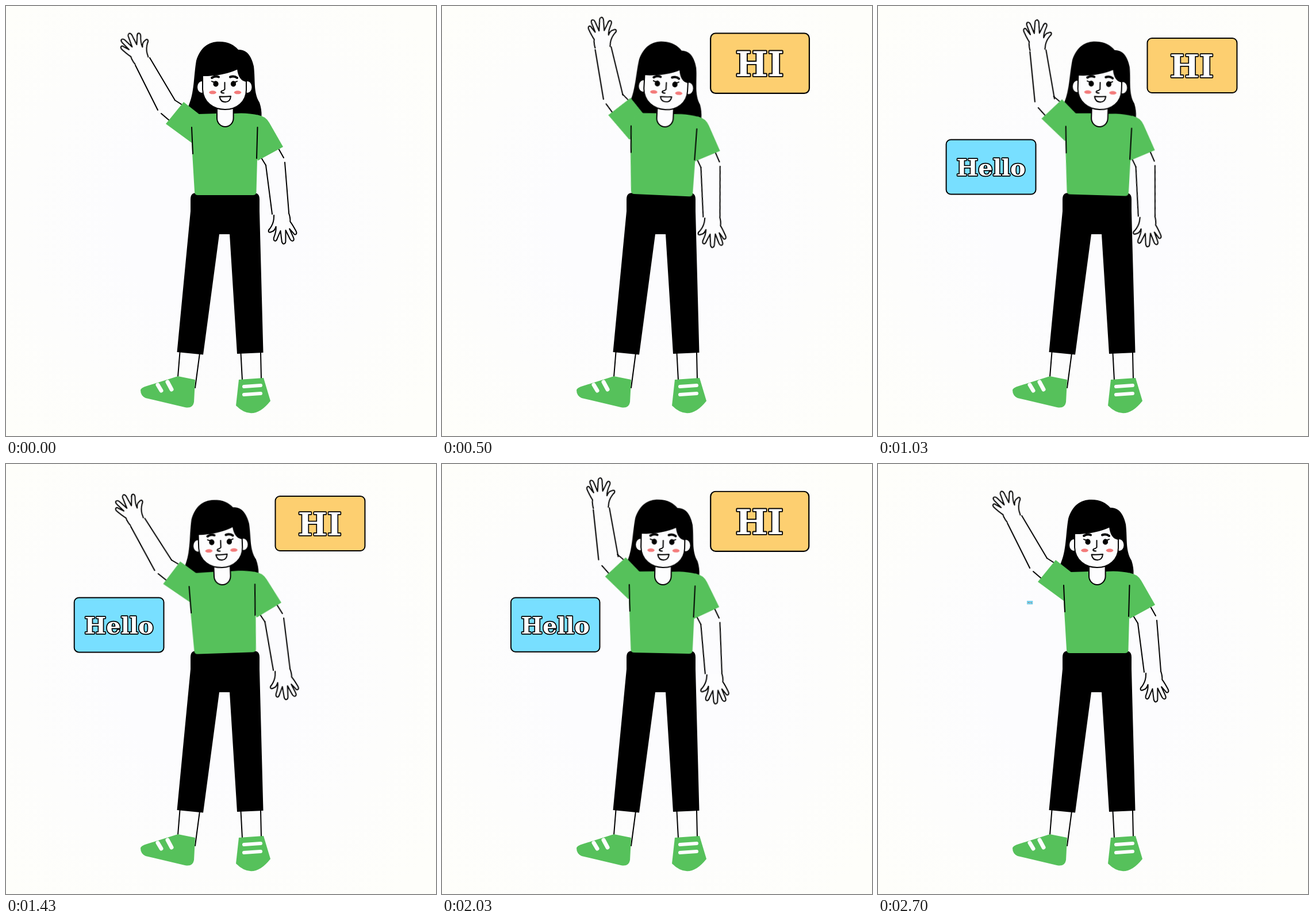
Animation of 748 by 748 pixels, one loop 2.73 s. Source, as an HTML page without scripts:

```html
<!DOCTYPE html>
<html lang="en">
<head>
<meta charset="utf-8">
<title>Waving hello</title>
<style>
  html, body { margin: 0; width: 100%; height: 100%; overflow: hidden; background: #fcfcfd; }
  svg { display: block; width: 100%; height: 100%; }

  .green { fill: #56c15b; }
  .skin { fill: #fdfdfe; }
  .line { fill: none; stroke: #000; stroke-width: 2; stroke-linecap: round; stroke-linejoin: round; }
  .skin.line { fill: #fdfdfe; }
  .brow { stroke-width: 4; }
  .strap { fill: none; stroke: #fdfdfe; stroke-linecap: round; }
  .blush { fill: #f37b7b; }
  .card text {
    font-family: "DejaVu Serif", serif; font-weight: bold; text-anchor: middle;
    fill: #fff; stroke: #000; stroke-width: 3.4; stroke-linejoin: round; paint-order: stroke;
  }
  .card rect { stroke: #000; stroke-width: 2; }

  .move { animation: 2730ms cubic-bezier(.37, 0, .63, 1) infinite; }
  .bob { animation-name: bob; }
  .torso { animation-name: torso; transform-origin: 381px 340px; }
  .head { animation-name: head; transform-origin: 381px 185px; }
  .wave-upper { animation-name: wave-upper; transform-origin: 340px 224px; }
  .wave-fore { animation-name: wave-fore; transform-origin: 279px 174px; }
  .wave-hand { animation-name: wave-hand; transform-origin: 236px 95px; }
  .rest-upper { animation-name: rest-upper; transform-origin: 440px 205px; }
  .rest-fore { animation-name: rest-fore; transform-origin: 468px 274px; }
  .eyes { animation-name: blink; transform-origin: 380px 133px; }
  .mouth { animation-name: talk; transform-origin: 381px 160px; }
  .hi { animation-name: hi; transform-origin: 481.8px 141.5px; }
  .hello { animation-name: hello; transform-origin: 268.7px 238.4px; }

  @keyframes bob { 0%, 20%, 100% { transform: none; } 9.9% { transform: translateY(1.5px); } }
  @keyframes torso {
    0%, 100% { transform: rotate(0deg); }
    27.8% { transform: rotate(3.5deg); }
    53.1% { transform: rotate(-2deg); }
    80.2% { transform: rotate(1.6deg); }
  }
  @keyframes head { 0%, 12%, 38%, 100% { transform: rotate(0deg); } 26.7% { transform: rotate(1.2deg); } }
  @keyframes wave-upper {
    0%, 51.3%, 100% { transform: rotate(0deg); }
    23.8% { transform: rotate(12deg); }
    76.2% { transform: rotate(6.8deg); }
  }
  @keyframes wave-fore {
    0%, 8.8%, 52.4%, 98.9%, 100% { transform: rotate(0deg); }
    35.5% { transform: rotate(14deg); }
    80.2% { transform: rotate(14deg); }
  }
  @keyframes wave-hand {
    0%, 52.4%, 100% { transform: rotate(0deg); }
    22% { transform: rotate(6deg); }
    76% { transform: rotate(3deg); }
  }
  @keyframes rest-upper {
    0%, 100% { transform: rotate(0deg); }
    31.1% { transform: rotate(5.4deg); }
    53.1% { transform: rotate(-.5deg); }
    80.2% { transform: rotate(2.8deg); }
  }
  @keyframes rest-fore {
    0%, 52.4%, 100% { transform: rotate(0deg); }
    12%, 38%, 74% { transform: rotate(-1.3deg); }
  }
  @keyframes blink { 0%, 7.3%, 14.6%, 100% { transform: none; } 11% { transform: scaleY(.15); } }
  @keyframes talk { 0%, 16%, 37%, 100% { transform: none; } 26.7% { transform: scaleY(.42); } }
  @keyframes hi {
    0%, 8.2% { transform: scale(0); }
    19.4% { transform: scale(1.125); }
    26.7% { transform: scale(.9); }
    34.1% { transform: scale(1.05); }
    41.4% { transform: scale(.95); }
    48.7% { transform: scale(1.02); }
    56% { transform: scale(.98); }
    60.1% { transform: scale(1); }
    67.4% { transform: scale(.92); }
    75.1% { transform: scale(1.1); }
    84.6%, 100% { transform: scale(0); }
  }
  @keyframes hello {
    0%, 23.8% { transform: scale(0); }
    34.1% { transform: scale(1.12); }
    41.4% { transform: scale(.88); }
    48.7% { transform: scale(1.045); }
    56% { transform: scale(.955); }
    63.4% { transform: scale(1.02); }
    69.6% { transform: scale(1.04); }
    79.9% { transform: scale(.93); }
    89% { transform: scale(1.125); }
    98.9% { transform: scale(.064); }
    99.9%, 100% { transform: scale(0); }
  }
</style>
</head>
<body>
<svg viewBox="0 0 748 748">
  <defs>
    <radialGradient id="bg" gradientUnits="userSpaceOnUse" cx="350" cy="374" r="500">
      <stop offset=".3" stop-color="#fcfcfe"/>
      <stop offset="1" stop-color="#fefefa"/>
    </radialGradient>
    <!-- open hand, wrist at the origin, fingers up -->
    <path id="hand" class="skin line" d="M-13-1Q-14-10-12-16Q-15-23-18-34C-20-41-14-42-13-37L-8-28L-11-43C-13-51-7-52-5-46L-1-29L3-46C4-53 10-53 10-47L8-28L16-39C20-46 25-43 22-37Q15-27 14-19Q18-26 23-26C31-28 29-22 25-20Q18-14 15-6L13 1"/>
  </defs>
  <rect width="748" height="748" fill="url(#bg)"/>

  <!-- legs -->
  <path class="line" d="M302.500 602L299 645M337 604L329 664M408.500 604L411 651M443 603L444 649"/>
  <path class="green" d="M299 644L329 650L327 689Q325 701 311 698L243 682Q234 678 234 668Q235 664 245 661Z"/>
  <path class="strap" stroke-width="7" d="M264 659L270 669M281 654L288 667"/>
  <path class="green" d="M405 650L448 647L460 687Q430 725 400 695Z"/>
  <path class="strap" stroke-width="6" d="M414 662L443 660M414 676L443 674"/>
  <path d="M321 336Q321 325 331 325H431Q441 325 441 336V357L447.500 603L402 605L389 397H371L343 606.500L297.500 602L321 357Z"/>

  <g class="move bob"><g class="move torso">
    <g class="move head">
      <path d="M317 175C328 150 326 125 331 95C338 72 352 62 371 62C387 62 397 68 404 76C420 75 428 90 431 105C434 130 430 150 441 168Q445 180 444.500 192L334 192Q320 184 317 175Z"/>
    </g>

    <!-- waving arm -->
    <g class="move wave-upper">
      <path class="line" d="M294 164L305 171M270 187L284 199"/>
      <g class="move wave-fore">
        <path class="line" d="M225 103L264 181M250 90L294 164"/>
        <g class="move wave-hand"><use href="#hand" transform="translate(236 95) rotate(-33)"/></g>
      </g>
      <path class="green" d="M309 167L337 189L345 230L323 238L278 205Z"/>
    </g>

    <!-- resting arm -->
    <g class="move rest-upper">
      <path class="line" d="M474 248L483 264M444 264L452 277"/>
      <g class="move rest-fore">
        <path class="line" d="M452 277L463 362M485 272L492 359"/>
        <use href="#hand" transform="translate(479 362) rotate(167)"/>
      </g>
      <path class="green" d="M437 189.500Q451 191 458 203L482 245L438 269L425 230Z"/>
    </g>

    <path class="green" d="M366 187L335 188Q323 198 323 211L323 238L328 323Q328 329 334 329H430Q436 329 435.500 322L437 267L440 190Q418 185 397 187Z"/>
    <path class="line" d="M323 211L325 257M437.500 211L436 265"/>
    <path class="skin line" d="M367 175V195A14.300 15 0 0 0 395.600 195V175"/>

    <g class="move head">
      <ellipse class="skin" cx="340.500" cy="141" rx="7.500" ry="10"/>
      <ellipse class="skin" cx="420" cy="141" rx="7.500" ry="10"/>
      <path class="skin line" d="M342 121V145C343 168 361 180 381 180C402 180 418 166 418 146V131Q405 129 403 109Q378 121 342 121Z"/>
      <path class="line brow" d="M358 125Q364 121 370 123.500M390 123.500Q397 121 402 125"/>
      <g class="move eyes">
        <ellipse cx="365" cy="135.500" rx="4.600" ry="5"/>
        <ellipse cx="395.500" cy="135.500" rx="4.600" ry="5"/>
        <path class="line" d="M358 131Q361 133 365 131.500M402 131Q399 133 395 131.500"/>
      </g>
      <path class="line" d="M380.500 133V145Q379 147 375 148Q372 151 379 151.500"/>
      <ellipse class="blush" cx="359.500" cy="150.300" rx="6.200" ry="3"/>
      <ellipse class="blush" cx="403" cy="150.300" rx="6.200" ry="3"/>
      <path class="skin line move mouth" d="M371.500 157.500Q381 158 391 157Q390 167 381.500 167Q373 167 371.500 157.500Z"/>
    </g>
  </g></g>

  <g class="card move hi">
    <rect x="468.500" y="56" width="156" height="95" rx="8" fill="#fdcf70"/>
    <text x="546" y="124" font-size="54">HI</text>
  </g>
  <g class="card move hello">
    <rect x="118.500" y="232.500" width="156" height="95" rx="8" fill="#78dfff"/>
    <text x="196.500" y="295.500" font-size="40">Hello</text>
  </g>
</svg>
</body>
</html>
```
